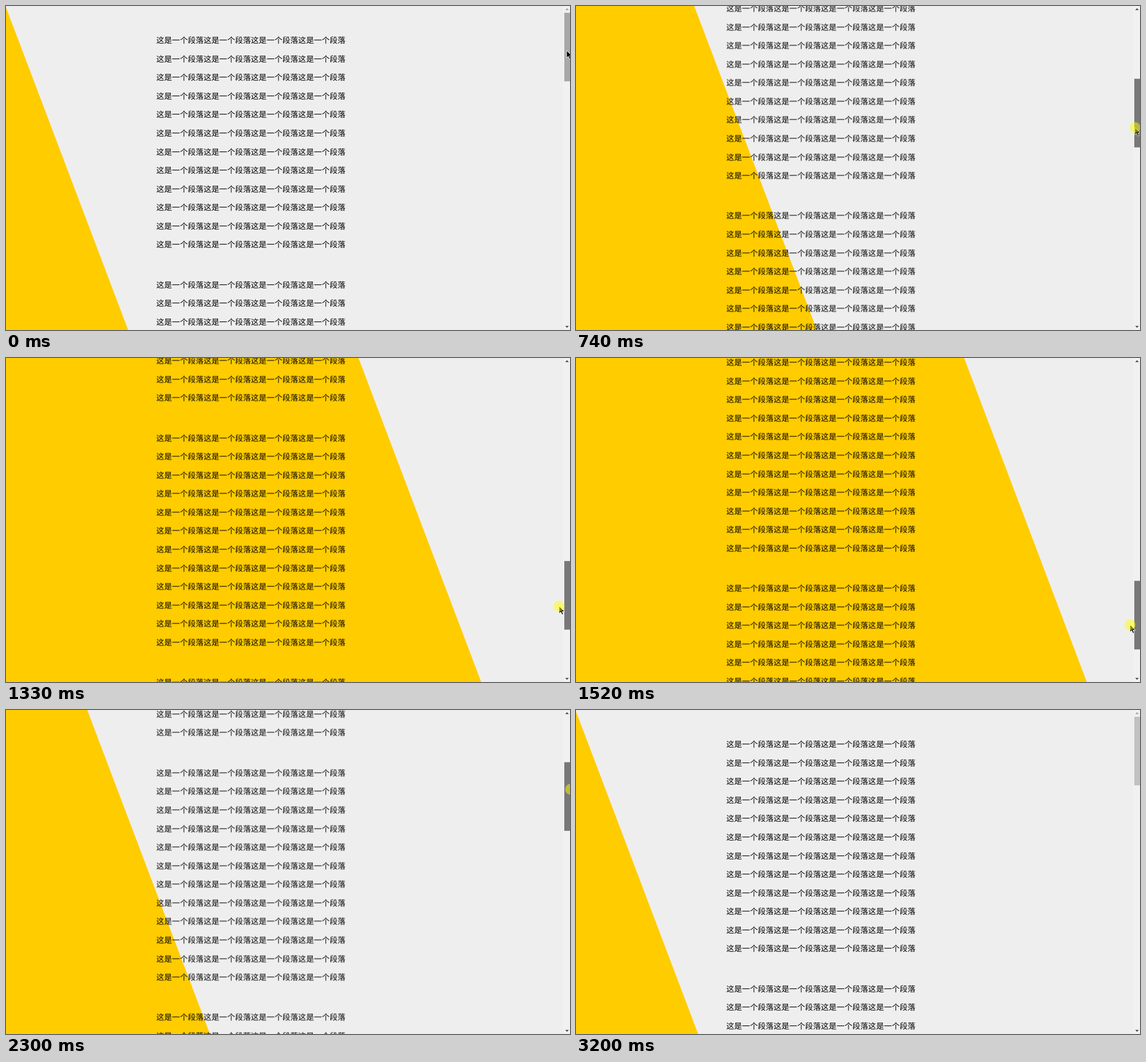
Write an HTML page that moves like this. It is 987 px wide and 568 px high and loops after 3450 ms.

```html
<!DOCTYPE html>
<html lang="zh">
<head>
<meta charset="utf-8">
<title>Scroll progress</title>
<style>
html, body { margin: 0; width: 100%; height: 100%; overflow: hidden; background: #eee; }
#stage { position: absolute; left: 0; top: 0; width: 987px; height: 568px; overflow: hidden; background: #eee; }
#stage svg { position: absolute; left: 0; top: 0; }
#page { position: absolute; left: 263px; top: 0; will-change: transform; }
#page p {
  position: absolute; margin: 0; white-space: nowrap; color: #000;
  font: 13.8px/20px "Noto Sans CJK SC", "Noto Sans CJK", sans-serif;
  text-rendering: geometricPrecision;
}
</style>
</head>
<body>
<div id="stage">
  <svg width="987" height="568"><polygon id="wedge" fill="#fc0"/></svg>
  <div id="page"></div>
  <svg width="987" height="568">
    <rect x="975" width="12" height="568" fill="#f1f1f1"/>
    <rect id="thumb" x="977" width="10" height="120.3"/>
    <path id="up" d="M978.6 7.2 L981.8 3.8 L985 7.2Z"/>
    <path id="down" d="M978.6 560.8 L981.8 564.2 L985 560.8Z"/>
    <g id="cursor">
      <path d="M0 0 V13 L3 10.2 L5.2 15 L7.4 14 L5.3 9.4 H9.4Z" fill="#000" stroke="#fff" stroke-width=".9"/>
      <circle id="press" r="9.5" fill="#ff0" fill-opacity=".5"/>
    </g>
  </svg>
</div>
<script>
const LOOP = 3450, MAX = 2014, SLOPE = .378;
const $ = id => document.getElementById(id);

// Bursts of screen updates: start, end, intervals
const bursts = [[230, 740, 7], [810, 1330, 8], [1400, 1920, 8], [1970, 2490, 8], [2550, 2810, 4], [3010, 3200, 3]];
const ticks = [0];
for (const [a, b, n] of bursts)
  for (let i = 0; i <= n; i++) ticks.push(Math.round((a + (b - a) * i / n) / 10) * 10);

// time, scroll offset
const scrollKeys = [
  [0, 0], [300, 0], [380, 25], [450, 95], [520, 195], [740, 549.7], [1070, 1121.3],
  [1330, 1634.4], [1530, 1870], [1740, MAX], [1970, MAX], [2040, 1880],
  [2170, 1130], [2300, 378.6], [2360, 120], [2430, 0], [LOOP, 0]
];
// time, pointer x, pointer y
const pointerKeys = [
  [0, 981, 78], [230, 980, 86], [300, 979, 95], [380, 979, 102], [740, 978, 213], [1070, 969, 324],
  [1330, 968, 435], [1600, 971, 498], [1920, 975, 520], [2040, 978, 470],
  [2300, 988, 139], [2430, 985, 85], [2550, 984, 68], [2680, 984, 38], [2750, 985, 14],
  [2810, 1010, 5], [3009, 1010, 5], [3010, 982, 483], [3070, 982, 512], [3140, 982, 541], [3200, 1010, 560], [LOOP, 1010, 560]
];

function at(keys, t) {
  const i = Math.max(1, keys.findIndex(k => k[0] >= t));
  const a = keys[i - 1], b = keys[i], f = (t - a[0]) / (b[0] - a[0]);
  return a.slice(1).map((v, j) => v + (b[j + 1] - v) * f);
}

for (let i = 0; i < 72; i++) {
  const p = document.createElement("p");
  p.textContent = "这是一个段落".repeat(4);
  p.style.top = 49.2 + Math.floor(i / 12) * 428.6 + (i % 12) * 32.57 + "px";
  $("page").append(p);
}

function draw(time) {
  const t = ticks.filter(k => k <= time).pop();
  const [s] = at(scrollKeys, t);
  const [x, y] = at(pointerKeys, t);
  const edge = v => (s + v - 2.5) * SLOPE;
  const pressed = t >= 300 && t < 2620;
  const hover = t < 300 || (t >= 2620 && t < 2810);

  $("page").style.transform = `translateY(${-s}px)`;
  $("wedge").setAttribute("points", `-400,0 ${edge(0)},0 ${edge(568)},568 -400,568`);
  $("thumb").setAttribute("y", 11.8 + s / MAX * 424);
  $("thumb").setAttribute("fill", pressed ? "#787878" : hover ? "#a8a8a8" : "#c1c1c1");
  $("up").setAttribute("fill", s > 0 ? "#505050" : "#a3a3a3");
  $("down").setAttribute("fill", s < MAX ? "#505050" : "#a3a3a3");
  $("cursor").setAttribute("transform", `translate(${x} ${y})`);
  $("press").setAttribute("visibility", pressed ? "visible" : "hidden");
}

const start = performance.now();
function frame() {
  draw((performance.now() - start) % LOOP);
  requestAnimationFrame(frame);
}
draw(0);
requestAnimationFrame(frame);
</script>
</body>
</html>
```
